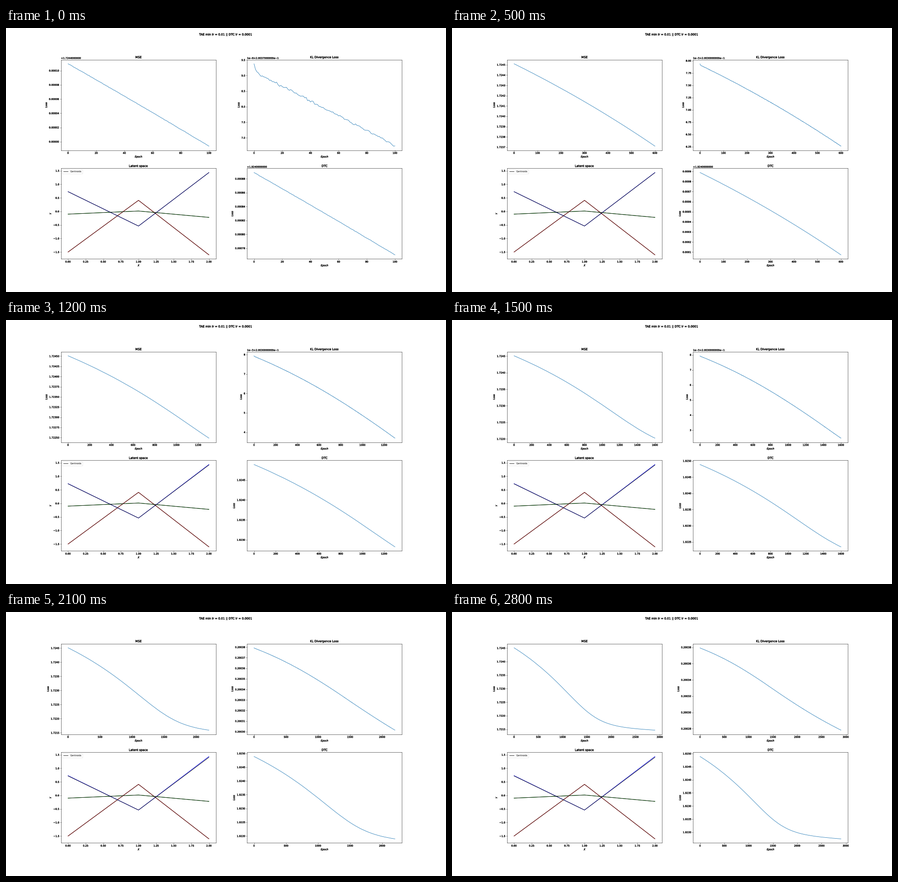
Animation of 966x580 px, one loop 2900 ms. Source, as a matplotlib script:

```python
import math

import matplotlib.pyplot as plt
import numpy as np
from matplotlib.animation import FuncAnimation
from matplotlib.patheffects import withStroke
from matplotlib.ticker import ScalarFormatter

WIDTH, HEIGHT, DPI = 966, 580, 38.64
FRAMES, INTERVAL, STEP = 29, 100, 100

plt.rcParams.update({
    "font.family": "DejaVu Sans",
    "font.size": 10,
    "axes.linewidth": 1.05,
    "axes.labelpad": 5.8,
    "xtick.major.width": 1.05,
    "ytick.major.width": 1.05,
    "lines.linewidth": 1.5,
})

HEAVY = [withStroke(linewidth=0.55, foreground="black")]
EPOCHS = np.arange(FRAMES * STEP + 1)


class LongOffset(ScalarFormatter):
    """Scalar formatter that writes the axis offset with ten decimals."""

    def format_data(self, value):
        exponent = math.floor(math.log10(abs(value)))
        text = f"{value / 10 ** exponent:.10f}"
        return f"{text}e{exponent}" if exponent else text


def total(rate):
    """Running trapezoid sum of a rate given per epoch."""
    return np.concatenate([[0], np.cumsum((rate[1:] + rate[:-1]) / 2)])


def noise(size):
    return rng.normal(0, size, EPOCHS.size)


rng = np.random.default_rng(4)

# MSE: the descent speeds up exponentially, then a sigmoid shuts it down
mse_rate = 0.1 + 1.03 * np.exp(EPOCHS / 1650) / (1 + np.exp((EPOCHS - 1535) / 235))
mse = 1.7245097 - 1e-6 * total(mse_rate) + noise(1.5e-7)

# KL: a short initial plunge, then a slow rise and fall of the slope
kl_rate = np.interp(EPOCHS, [0, 900, 1400, 1900, 2900],
                    [0.023, 0.0365, 0.0415, 0.039, 0.030])
plunge = 0.22 * np.exp(-EPOCHS / 1.4)
kl = 0.20037 + 1e-6 * (9.12 + plunge - total(kl_rate) + noise(0.022))

dtc = mse + kl

# Latent space: cluster colour, cluster values, total centroid drift
CLUSTERS = [
    ("red", np.array([-1.50, 0.41, -1.605]), np.zeros(3)),
    ("green", np.array([-0.10, 0.015, -0.22]), np.zeros(3)),
    ("blue", np.array([0.73, -0.54, 1.437]), np.array([-0.01, 0, -0.03])),
]

fig, axes = plt.subplots(
    2, 2, dpi=DPI, figsize=((WIDTH + 0.01) / DPI, (HEIGHT + 0.01) / DPI))
fig.set_facecolor("white")
fig.subplots_adjust(left=0.125, right=0.9, bottom=0.125, top=0.88,
                    wspace=0.2, hspace=0.2)
fig.suptitle("TAE min lr = 0.01 || DTC lr = 0.0001", y=0.9787,
             fontsize=12).set_path_effects(HEAVY)


def label_axes(ax, title, xlabel, ylabel):
    texts = [ax.set_title(title, fontsize=12),
             ax.set_xlabel(xlabel, style="italic"),
             ax.set_ylabel(ylabel, style="italic")]
    for text in texts + [ax.yaxis.get_offset_text()]:
        text.set_path_effects(HEAVY)


def thicken_ticks(ax):
    for text in ax.get_xticklabels() + ax.get_yticklabels():
        text.set_path_effects(HEAVY)


curves = []
for ax, title, loss in [(axes[0, 0], "MSE", mse),
                        (axes[0, 1], "KL Divergence Loss", kl),
                        (axes[1, 1], "DTC", dtc)]:
    ax.yaxis.set_major_formatter(LongOffset())
    label_axes(ax, title, "Epoch", "Loss")
    line, = ax.plot([], [], color="#1f77b4")
    curves.append((ax, line, loss))

latent = axes[1, 0]
label_axes(latent, "Latent space", "X", "Y")
for color, values, _ in CLUSTERS:
    latent.plot(range(3), values, color=color, linewidth=1.9)
centroids = [latent.plot(range(3), values, color="black")[0]
             for _, values, _ in CLUSTERS]
latent.legend(centroids[:1], ["Centroids"], loc="upper left")
thicken_ticks(latent)


def update(frame):
    count = (frame + 1) * STEP + 1
    for ax, line, loss in curves:
        line.set_data(EPOCHS[:count], loss[:count])
        ax.relim()
        ax.autoscale_view()
        thicken_ticks(ax)
    progress = min(1, (frame / 20) ** 1.3)
    for line, (_, values, drift) in zip(centroids, CLUSTERS):
        line.set_ydata(values + drift * progress)
    return [line for _, line, _ in curves] + centroids


anim = FuncAnimation(fig, update, frames=FRAMES, interval=INTERVAL,
                     repeat=True, repeat_delay=0, blit=False)
plt.show()
```
